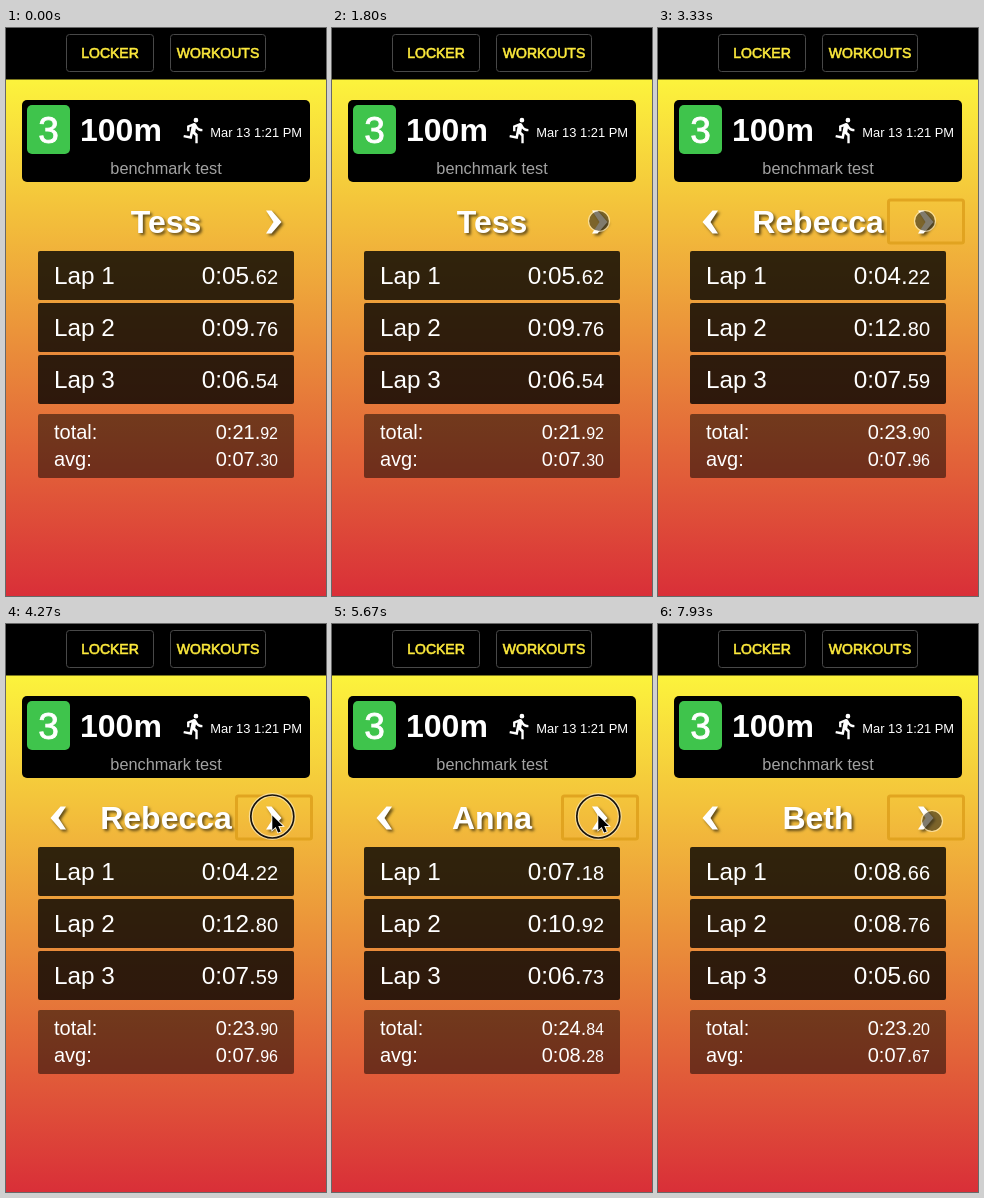
Animation, 320 px wide and 568 px high, one loop 8000 ms. Source, as an HTML page with a canvas:

```html
<!DOCTYPE html>
<html lang="en">
<head>
<meta charset="utf-8">
<title>Lap times</title>
<style>
  html, body { margin: 0; width: 100%; height: 100%; overflow: hidden; background: #000; }
  canvas { display: block; width: 320px; height: 568px; }
</style>
</head>
<body>
<canvas id="stage" width="320" height="568"></canvas>
<script>
const ctx = document.getElementById('stage').getContext('2d');
const LOOP = 8000;
const FAMILY = '"Liberation Sans", Arial, sans-serif';

const runners = [
  { from: 0,    name: 'Tess',    laps: ['0:05.62', '0:09.76', '0:06.54'], total: '0:21.92', avg: '0:07.30' },
  { from: 2900, name: 'Rebecca', laps: ['0:04.22', '0:12.80', '0:07.59'], total: '0:23.90', avg: '0:07.96' },
  { from: 4350, name: 'Anna',    laps: ['0:07.18', '0:10.92', '0:06.73'], total: '0:24.84', avg: '0:08.28' },
  { from: 5750, name: 'Peter H', laps: ['0:09.95', '0:08.97', '0:06.48'], total: '0:25.41', avg: '0:08.47' },
  { from: 7150, name: 'Beth',    laps: ['0:08.66', '0:08.76', '0:05.60'], total: '0:23.20', avg: '0:07.67' }
];

// pointer path: time, x, y
const path = [
  [130, 312, 582], [900, 290, 310], [1450, 267, 193], [5950, 267, 193],
  [6450, 287, 208], [6680, 287, 208], [7020, 267, 193], [7400, 267, 193],
  [7800, 274, 197]
];

const runnerIcon = new Path2D('M13.5 5.5a2 2 0 1 0 0-4a2 2 0 0 0 0 4z' +
  'M9.9 19.4l1-4.4 2.1 2v6h2v-7.5l-2.1-2 .6-3c1.3 1.5 3.3 2.5 5.5 2.5v-2' +
  'c-1.9 0-3.5-1-4.3-2.4l-1-1.6c-.4-.6-1-1-1.7-1-.3 0-.5.1-.8.1l-5.2 2.2v4.7h2' +
  'v-3.4l1.8-.7-1.6 8.1-4.9-1-.4 2z');
const arrowIcon = new Path2D('M0 0V14.5L3.4 11.4L5.8 17L8.4 15.9L6 10.4H10.6Z');

// "extra" thickens the glyphs to a medium weight.
function text(str, x, y, size, { color = '#fff', weight = 'normal', align = 'left', extra = 0 } = {}) {
  ctx.font = `${weight} ${size}px ${FAMILY}`;
  ctx.textAlign = align;
  ctx.fillStyle = color;
  ctx.fillText(str, x, y);
  if (extra) {
    ctx.strokeStyle = color;
    ctx.lineWidth = extra;
    ctx.strokeText(str, x, y);
  }
}

function box(x, y, w, h, r, color) {
  ctx.beginPath();
  ctx.roundRect(x, y, w, h, r);
  ctx.fillStyle = color;
  ctx.fill();
}

function frame(x, y, w, h, r, color, width) {
  ctx.beginPath();
  ctx.roundRect(x, y, w, h, r);
  ctx.strokeStyle = color;
  ctx.lineWidth = width;
  ctx.stroke();
}

function ring(x, y, r, color, width) {
  ctx.beginPath();
  ctx.arc(x, y, r, 0, Math.PI * 2);
  ctx.strokeStyle = color;
  ctx.lineWidth = width;
  ctx.stroke();
}

// Hundredths are set smaller than the rest of the time.
function clock(value, y, big, small) {
  const head = value.slice(0, -2);
  const tail = value.slice(-2);
  text(tail, 272, y, small, { align: 'right' });
  text(head, 272 - ctx.measureText(tail).width, y, big, { align: 'right' });
}

function withShadow(draw) {
  ctx.save();
  ctx.shadowColor = 'rgba(0,0,0,.6)';
  ctx.shadowOffsetX = ctx.shadowOffsetY = 2;
  ctx.shadowBlur = 3;
  draw();
  ctx.restore();
}

function chevron(x, dir) {
  ctx.beginPath();
  [[0, 182.5], [5.5, 182.5], [15.5, 194], [5.5, 205.5], [0, 205.5], [7.5, 194]]
    .forEach(([dx, y]) => ctx.lineTo(x + dx * dir, y));
  ctx.closePath();
  ctx.fillStyle = '#fff';
  ctx.fill();
}

function drawHeader() {
  box(0, 0, 320, 51.5, 0, '#000');
  frame(60.5, 6.5, 87, 37, 3, '#484848', 1);
  frame(164.5, 6.5, 95, 37, 3, '#484848', 1);
  const style = { color: '#fdea3c', align: 'center', extra: 0.6 };
  text('LOCKER', 104, 30, 14, style);
  text('WORKOUTS', 212, 30, 14, style);
}

function drawCard() {
  box(16, 72, 288, 82, 5, '#000');
  box(21, 77, 43, 49, 5, '#3fc44c');
  text('3', 42.5, 115, 37, { align: 'center', extra: 0.9 });
  text('100m', 74, 113, 32, { weight: 'bold' });
  ctx.save();
  ctx.translate(174, 88);
  ctx.scale(1.18, 1.18);
  ctx.fill(runnerIcon);
  ctx.restore();
  text('Mar 13 1:21 PM', 296, 109, 12.9, { align: 'right' });
  text('benchmark test', 160, 146, 16.3, { color: '#a2a2a2', align: 'center' });
}

function drawResults(runner, first) {
  withShadow(() => {
    text(runner.name, 160, 205, 32, { weight: 'bold', align: 'center' });
    chevron(260, 1);
    if (!first) chevron(60, -1);
  });
  if (!first) frame(230.5, 172, 75, 43, 2, 'rgba(222,160,28,.85)', 3);

  runner.laps.forEach((lap, i) => {
    const y = 223 + i * 52;
    box(32, y, 256, 49, 2, 'rgba(0,0,0,.8)');
    text('Lap ' + (i + 1), 48, y + 33, 24.3);
    clock(lap, y + 33, 24.3, 20);
  });

  box(32, 386, 256, 64, 2, 'rgba(0,0,0,.5)');
  text('total:', 48, 411, 20);
  clock(runner.total, 411, 20, 16);
  text('avg:', 48, 438, 20);
  clock(runner.avg, 438, 20, 16);
}

function pointerAt(t) {
  const next = path.findIndex(p => p[0] > t);
  if (next === 0) return null;
  if (next < 0) return path[path.length - 1].slice(1);
  const [t0, x0, y0] = path[next - 1];
  const [t1, x1, y1] = path[next];
  const k = (t - t0) / (t1 - t0);
  const e = k * k * (3 - 2 * k);
  return [x0 + (x1 - x0) * e, y0 + (y1 - y0) * e];
}

function drawPress(x, y) {
  ring(x, y, 21.5, 'rgba(255,255,255,.5)', 4);
  ring(x, y, 21.5, '#17130c', 1.7);
  ctx.save();
  ctx.translate(x, y - 1);
  ctx.strokeStyle = '#fff';
  ctx.lineWidth = 1.6;
  ctx.stroke(arrowIcon);
  ctx.fillStyle = '#000';
  ctx.fill(arrowIcon);
  ctx.restore();
}

function drawDot(x, y) {
  box(x - 10, y - 10, 20, 20, 10, 'rgba(62,54,34,.66)');
  ring(x, y, 10.5, 'rgba(255,245,215,.6)', 1.2);
}

function drawPointer(t) {
  const pos = pointerAt(t);
  if (!pos) return;
  const [x, y] = pos;
  const pressed = runners.some(r => r.from && t >= r.from - 140 && t < r.from + 50);
  if (pressed) drawPress(x - 0.7, y - 0.5);
  else drawDot(x, y);
}

const sky = ctx.createLinearGradient(0, 52, 0, 568);
sky.addColorStop(0, '#fcf33c');
sky.addColorStop(1, '#d92f38');

function render(now) {
  const t = now % LOOP;
  const index = runners.filter(r => r.from <= t).length - 1;
  box(0, 0, 320, 568, 0, sky);
  drawHeader();
  drawCard();
  drawResults(runners[index], index === 0);
  drawPointer(t);
}

const start = performance.now();
function tick() {
  render(performance.now() - start);
  requestAnimationFrame(tick);
}
tick();
</script>
</body>
</html>
```
